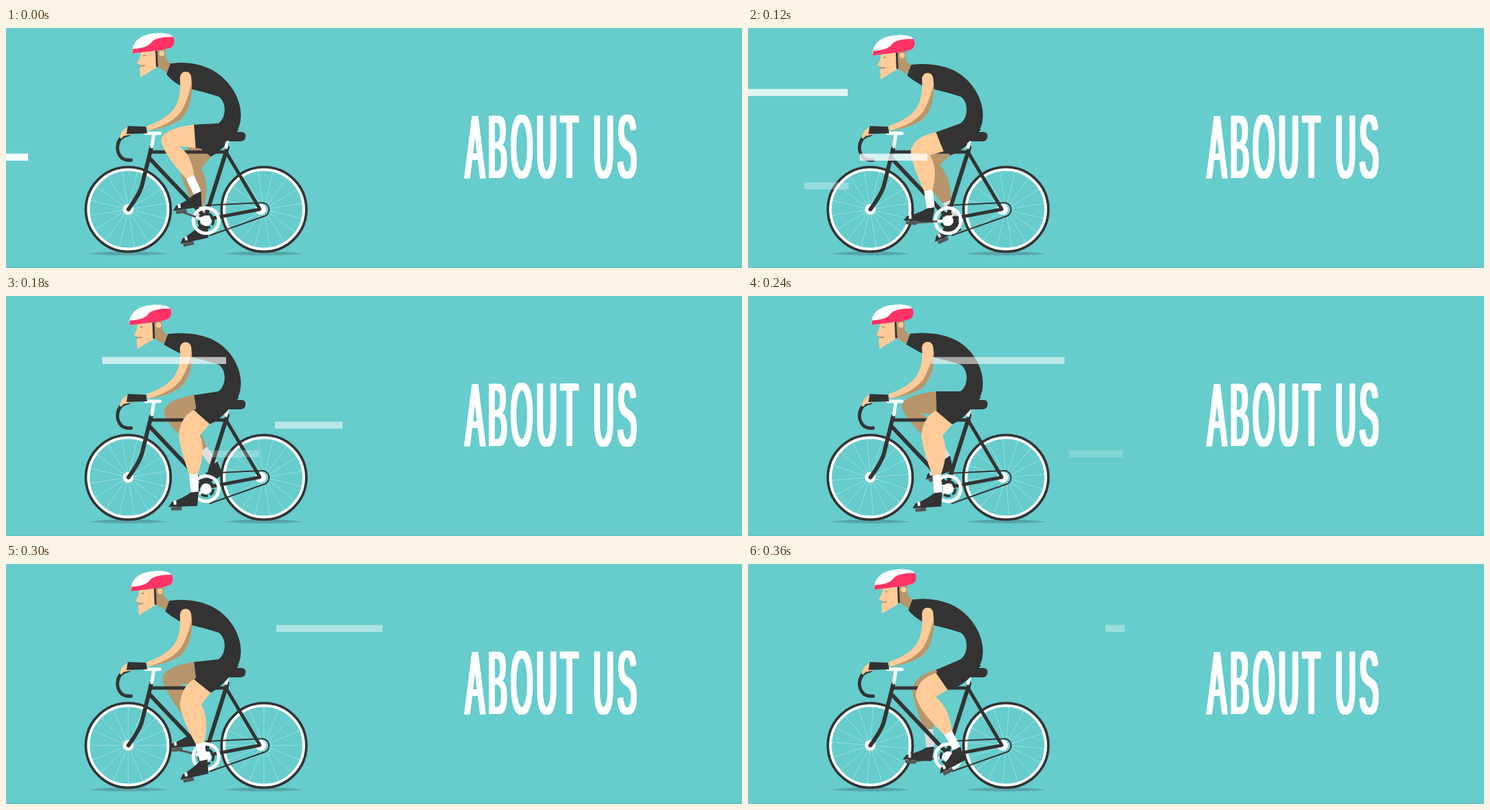
An HTML page for the animation above (390 ms loop, 1100x360 px).

```html
<!DOCTYPE html>
<html lang="en">
<head>
<meta charset="utf-8">
<title>About us</title>
<style>
  html, body { margin: 0; width: 100%; height: 100%; overflow: hidden; background: #66cccc; }
  svg { position: absolute; left: 0; top: 0; display: block; }
  h1 {
    position: absolute; left: 686.6px; top: 110.7px; margin: 0;
    font: 400 135px/1 "Liberation Sans", Arial, sans-serif;
    font-kerning: none; letter-spacing: 19px; white-space: nowrap; color: #fff;
    text-shadow: -4px 0, 4px 0, -8px 0, 8px 0;
    transform: scaleX(.31); transform-origin: 0 0;
  }
  .dark { fill: #333; }
  .tube { fill: none; stroke: #333; stroke-width: 6; stroke-linecap: round; stroke-linejoin: round; }
  .white { fill: #fff; }
  .skin { fill: #ffcc99; }
  .shade { fill: #b8956a; }
</style>
</head>
<body>
<svg width="1100" height="360" viewBox="0 0 1100 360">
  <defs><clipPath id="lane"><rect width="563" height="360"/></clipPath></defs>
  <rect y="358" width="1100" height="2" fill="#62c3c3"/>
  <g fill="#56a5a8">
    <path d="M122 339Q150 335 182 335Q215 335 243 339Q182 343 122 339Z"/>
    <path d="M325 339Q353 335 385 335Q418 335 446 339Q385 343 325 339Z"/>
  </g>
  <g id="wheels"></g>
  <g id="far"></g>

  <g class="tube">
    <path d="M217 186H330" stroke-width="5"/>
    <path d="M215 196L297 283"/>
    <path d="M331 179L297 287"/>
    <path d="M330 188L379 271" stroke-width="5"/>
    <path d="M300 287L379 272" stroke-width="5"/>
    <path d="M217 180L203 237Q199 250 183 272"/>
    <path d="M183 160C165 163 162 184 173 195Q179 199 187 198" stroke-width="5"/>
    <path d="M299 266L381 262A10 10 0 0 1 384 283L305 311" stroke-width="2"/>
  </g>
  <path d="M209 158H230M221 159L218 178M331 169L329 179" fill="none" stroke="#fff" stroke-width="5" stroke-linecap="round"/>
  <path class="dark" d="M318 164L334 156H352Q358 156 358 162Q358 170 350 170H334Z"/>

  <g id="ring">
    <circle r="19" fill="none" stroke="#fff" stroke-width="5"/>
    <circle r="11" fill="none" stroke="#333" stroke-width="3.5" stroke-dasharray="10 3.82"/>
    <circle class="white" r="8"/>
  </g>

  <g id="head">
    <path class="shade" d="M225 34L238 32L239 46L248 55L240 66L226 57Z"/>
    <path class="skin" d="M202 36L200 45L196 53L202 55L200 60L201 74L227 58V33Z"/>
    <path d="M200 57L208 56" stroke="#c98a6a" stroke-width="2"/>
    <path d="M205 41H209" stroke="#b8956a" stroke-width="2"/>
    <circle class="skin" cx="233" cy="38" r="4"/>
    <path d="M225 32L226 58" stroke="#333" stroke-width="3"/>
    <path class="white" d="M189 38C188 27 194 16 207 11C221 6 240 6 248 11C253 16 253 25 247 29L222 34Z"/>
    <path fill="#ff3366" d="M189 38L190 31Q211 30 217 22Q223 13 250 13C254 19 251 27 247 29Q236 33 222 34Z"/>
  </g>
  <path class="dark" id="torso"/>
  <g id="near"></g>
  <path class="skin" id="arm"/>
  <path class="shade" id="armShade"/>
  <path class="skin" d="M170 165Q171 153 184 147L186 160L176 162L172 166Z"/>
  <path class="dark" d="M182 147L209 148L211 158L180 159Z"/>
  <g id="streaks" class="white" clip-path="url(#lane)"></g>
</svg>
<h1>ABOUT US</h1>

<script>
const LOOP = 390;
// [time in ms, phase of the ride, near pedal angle, far pedal angle]
const STEPS = [
  [0, 1, 21, 180], [90, 2, 65, 200], [120, 3.5, 75, 218], [150, 5, 85, 237], [180, 6, 143, 300],
  [240, 8, 150, 350], [270, 9, 155, 375], [300, 10, 180, 395], [330, 11, 205, 415], [360, 12, 240, 445]
];
// At phase 5: y, left, right, speed of each end; then opacity = a - b * phase
const STREAKS = [
  [91.5, 79, 257, 65, 72, .98, .053],
  [188.5, 308, 409, 94, 94, 1.05, .085],
  [231.5, 216, 287, 88, 91, .41, .027]
];

const HUB = [299, 289];
const $ = id => document.getElementById(id);
const set = (id, name, value) => $(id).setAttribute(name, value);
const sin = deg => Math.sin(deg * Math.PI / 180);
const cos = deg => Math.cos(deg * Math.PI / 180);
const mix = (a, b, k) => a.map((v, i) => v + (b[i] - v) * k);
const add = (a, b, k = 1) => [a[0] + b[0] * k, a[1] + b[1] * k];
const pt = p => p.map(v => v.toFixed(1)).join(" ");
const side = u => [u[1], -u[0]];
function unit(a, b) {
  const x = b[0] - a[0], y = b[1] - a[1], l = Math.hypot(x, y) || 1;
  return [x / l, y / l];
}

// The angle runs from the top of the stroke towards the front.
const pedalAt = angle => [273 - 30 * sin(angle), 299 - 25 * cos(angle)];

function leg(angle, skin, sock) {
  // Foot: rides on the pedal, toe dropping on the way up
  const pedal = pedalAt(angle);
  const tilt = 18 * cos(angle - 95) - 14;
  const d = [cos(tilt), sin(tilt)], up = side(d);
  const toe = add(add(pedal, d, -12), up, 3);
  const heel = add(toe, d, 43);
  const collar = add(add(heel, up, 21), d, -3);
  const tip = add(add(toe, d, 5), up, 7);

  // Thigh: sinks as the leg goes down, 1 at the lowest point
  const sink = -cos(angle + 8);
  const hem1 = [281, 158 + 15 * sink], hem2 = [294 + 12 * sink, 186 + 7 * sink];
  const knee = [245 + 15 * sink, 188 + 23 * sink];
  const bend = add(knee, [29 + 3 * sink, 5 - 5 * sink]);

  // Lower leg: points from the shoe to the middle of the knee
  const shaft = unit(collar, add(knee, [18, 0])), p = side(shaft);
  const ankle = add(collar, shaft, 27);
  const a1 = add(ankle, p, 6.5), a2 = add(ankle, p, -6.5);
  const c1 = add(collar, p, 6), c2 = add(collar, p, -6);
  const over = [knee[0] + 3, hem1[1] + .25 * (knee[1] - hem1[1])];
  const shin = [knee[0] + 2, knee[1] + .35 * (ankle[1] - knee[1])];
  const calf = add(mix(bend, a2, .4), side(unit(bend, a2)), 11);
  const instep = add(mix(tip, c1, .6), up, -3);
  const mark = add(toe, d, 10);

  return `<path d="M${HUB}L${pt(pedal)}" stroke="#555" stroke-width="3"/>
    <path d="M${HUB}L${pt(add(HUB, unit(HUB, pedal), 16))}" stroke="#fff" stroke-width="4"/>
    <path d="M${pt(add(pedal, d, -8))}L${pt(add(pedal, d, 8))}" stroke="#555" stroke-width="5"/>
    <path fill="${sock}" d="M${pt(a1)}L${pt(a2)}L${pt(c2)}L${pt(c1)}Z"/>
    <path class="${skin}" d="M${pt(hem1)}Q${pt(over)} ${pt(knee)}Q${pt(shin)} ${pt(a1)}L${pt(a2)}Q${pt(calf)} ${pt(bend)}L${pt(hem2)}Z"/>
    <path class="dark" d="M${pt(c1)}L${pt(c2)}L${pt(heel)}L${pt(toe)}L${pt(tip)}Q${pt(instep)} ${pt(c1)}Z"/>
    <path d="M${pt(add(mark, up, 3))}L${pt(add(mark, up, 9))}" stroke="${sock}" stroke-width="4"/>
    <path class="dark" d="M318 143L${pt(hem1)}L${pt(hem2)}Q322 186 348 152Z"/>`;
}

function wheel(x, hub, turn) {
  let spokes = "";
  for (let a = turn; a < turn + 360; a += 22.5) spokes += `M0 0L${pt([58 * cos(a), 58 * sin(a)])}`;
  return `<g transform="translate(${x} 272)" fill="none">
    <path d="${spokes}" stroke="#fff" stroke-opacity=".35"/>
    <circle r="63.3" stroke="#333" stroke-width="4"/>
    <circle r="59.5" stroke="#fff" stroke-width="4"/>
    <circle class="white" cx="${hub}" r="8"/></g>`;
}

function streak([y, l, r, vl, vr, a, b], phase) {
  const x = l + vl * (phase - 5), end = r + vr * (phase - 5);
  return `<rect x="${x}" y="${y}" width="${end - x}" height="10.5" opacity="${Math.max(0, a - b * phase)}"/>`;
}

function draw([, phase, near, far]) {
  const dip = sin(180 * phase / 13.3) ** 2, s = 4 * dip;
  const [px, py] = pedalAt(near);
  const crank = Math.atan2(py - HUB[1], px - HUB[0]) * 180 / Math.PI;

  $("wheels").innerHTML = wheel(182.7, 0, -9 * phase) + wheel(385.5, -5, -9 * phase);
  $("far").innerHTML = leg(far, "shade", "#ddd");
  $("near").innerHTML = leg(near, "skin", "#fff");
  $("streaks").innerHTML = STREAKS.map(k => streak(k, phase)).join("");
  set("ring", "transform", `translate(${HUB}) rotate(${crank})`);
  set("head", "transform", `translate(${-5 * dip} ${6 * dip})`);

  set("torso", "d", `M${246 - s} ${53 + s}Q275 ${49 + s} 300 ${59 + .75 * s}C332 72 352 105 351 132
    Q351 150 340 160L318 165L312 146C330 140 331 112 318 103Q300 97 274 91L262 87
    Q248 80 ${240 - s} ${69 + s}Z`);
  const outer = "C280 104 273 126 261 137Q243 150 212 154";
  set("arm", "d", `M260 ${75 + s}C260 ${62 + s} 277 ${62 + s} 277 ${75 + s}${outer}
    L210 147Q240 137 252 120C260 105 261 95 260 ${75 + s}Z`);
  set("armShade", "d", `M277 ${82 + s}${outer}Q247 145 262 125Q273 106 277 ${82 + s}Z`);
}

const start = performance.now();
let shown;
function tick() {
  const t = (performance.now() - start) % LOOP;
  const step = STEPS.filter(k => k[0] <= t).pop();
  if (step !== shown) draw(shown = step);
  requestAnimationFrame(tick);
}
tick();
</script>
</body>
</html>
```
